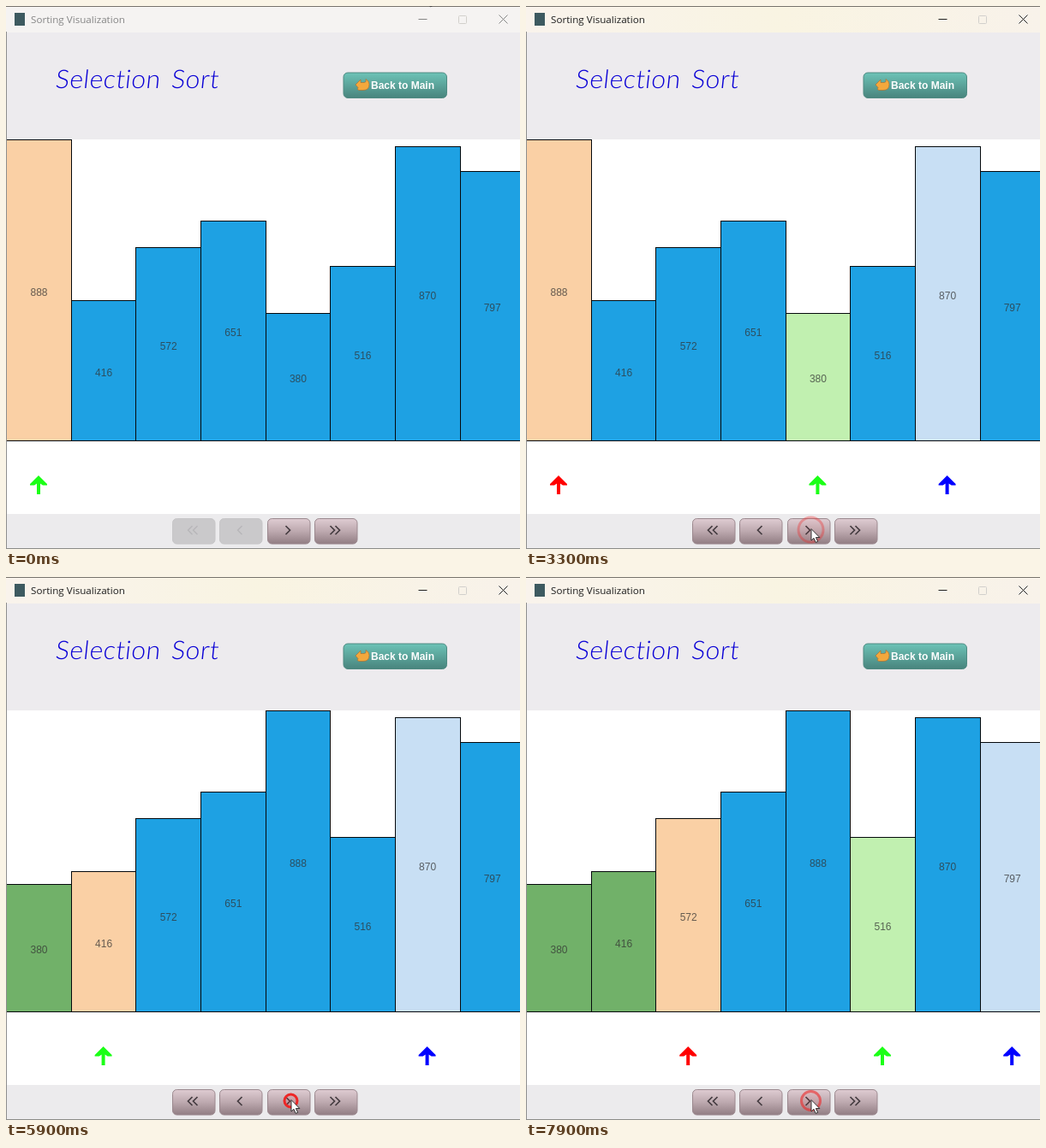
Animation, 600 px wide and 635 px high, one loop 8 s. Source, as an HTML page:

```html
<!DOCTYPE html>
<html lang="en">
<head>
<meta charset="utf-8">
<title>Sorting Visualization</title>
<style>
html, body { margin: 0; width: 100%; height: 100%; overflow: hidden; background: #fff; }
svg { display: block; width: 600px; height: 635px; }
text { font-family: "Liberation Sans", Arial, sans-serif; font-size: 12px; }
#caption { font-family: "Open Sans", "Noto Sans", sans-serif; font-size: 11.65px; }
#heading { font-family: Lato, sans-serif; font-size: 30px; font-weight: 300; letter-spacing: .5px; word-spacing: 4px; fill: #0a00d6; }
#back { font-weight: bold; fill: #fff; }
#bars rect { stroke: #05090c; }
#bars text { text-anchor: middle; fill: #323232; fill-opacity: .74; }
.key path { fill: none; stroke: #453c41; stroke-width: 1.7; }
.key rect { fill: url(#pink); stroke: #9b888e; }
.key.off rect { fill: #cac9cb; stroke: #c6c5c7; }
.key.off path { stroke: #b7b6b9; stroke-width: 1.4; }
</style>
</head>
<body>
<svg viewBox="0 0 600 635">
  <defs>
    <linearGradient id="pink" x2="0" y2="1">
      <stop stop-color="#dfccd2"/><stop offset=".5" stop-color="#bda9af"/><stop offset="1" stop-color="#917d83"/>
    </linearGradient>
    <linearGradient id="teal" x2="0" y2="1">
      <stop stop-color="#6dc3b7"/><stop offset="1" stop-color="#48847d"/>
    </linearGradient>
    <linearGradient id="cream">
      <stop stop-color="#f9f3ec"/><stop offset=".5" stop-color="#f9f4e2"/><stop offset="1" stop-color="#f8f2ea"/>
    </linearGradient>
    <path id="arrow" d="M0 549l10 10v1.500h-5l-3-2v12.500h-4v-12.500l-3 2h-5v-1.500z"/>
  </defs>

  <rect width="600" height="635" fill="#fff"/>
  <rect id="titlebar" width="600" height="31"/>
  <rect y="31" width="600" height="125" fill="#edebee"/>
  <rect y="594" width="600" height="41" fill="#ecebed"/>
  <rect width="600" height="1" fill="#77736c"/>
  <rect y="634" width="600" height="1" fill="#8b8b87"/>

  <rect x="10" y="8" width="12" height="15" fill="#3d5a60"/>
  <text id="caption" x="29" y="20">Sorting Visualization</text>
  <g id="controls" fill="none">
    <path d="M481.500 15.500h10M575.500 10.500l10 10m0-10l-10 10"/>
  </g>
  <rect x="528.500" y="11.500" width="9" height="9" rx="1" fill="none" stroke="#d2d0cc"/>

  <text id="heading" transform="translate(57 96) skewX(-6)">Selection Sort</text>
  <rect x="394" y="78" width="120.500" height="29.500" rx="5" fill="url(#teal)" stroke="#4f8a82"/>
  <path d="M408 92l6-6v3.500h4q3 0 2-4q4 2 4 6q0 7-7 7h-5q-3-1-1-3z" fill="#f3a83c" stroke="#a9692a" stroke-width=".6"/>
  <text id="back" x="426" y="97">Back to Main</text>

  <g id="bars"></g>
  <rect y="30" width="1" height="605" fill="#8f8f8f"/>
  <use id="first" href="#arrow" fill="#f00"/>
  <use id="least" href="#arrow" fill="#1bff16"/>
  <use id="probe" href="#arrow" fill="#00f"/>

  <g id="keys"></g>
  <circle id="ring" cx="332.500" cy="612.500" fill="#f33" fill-opacity=".12" stroke="#ee2626" stroke-width="3"/>
  <path id="cursor" d="M0 0v13.500l3-2.700 2.200 5 2.400-1-2.200-4.800h4.400z" fill="#fff" stroke="#222" stroke-width=".9"/>
</svg>

<script>
const LOOP = 8000, TICK = 100, STEP_X = 75.65, FLOOR = 508.5;
const $ = id => document.getElementById(id);
const set = (el, attrs) => { for (const k in attrs) el.setAttribute(k, attrs[k]); return el; };
const add = (parent, tag, attrs = {}) =>
  parent.appendChild(set(document.createElementNS("http://www.w3.org/2000/svg", tag), attrs));

const COLORS = { idle: "#1ea1e3", current: "#fad0a5", probe: "#c8dff4", least: "#c1f0b0", done: "#71b169" };
const stepTimes = [0, 1200, 1600, 1900, 2100, 2400, 2600, 2900, 3200, 3500, 4000, 4300,
  4600, 4900, 5200, 5600, 6000, 6500, 6800, 7000, 7300, 7500, 7700, 7900];

// One entry per click of the "next" button.
function sortSteps(values) {
  const steps = [], list = [...values];
  for (let i = 0; i < list.length - 1; i++) {
    let min = i;
    const push = j => steps.push({ list: [...list], i, min, j });
    push(-1);
    for (let j = i + 1; j < list.length; j++) {
      push(j);
      if (list[j] < list[min]) { min = j; push(-1); }
    }
    [list[i], list[min]] = [list[min], list[i]];
  }
  return steps;
}
const steps = sortSteps([888, 416, 572, 651, 380, 516, 870, 797]);

const edge = k => Math.round(STEP_X * k) + .5;
const barTop = v => Math.round(509.95 - .3982 * v) + .5;
const bars = steps[0].list.map((_, k) => ({
  box: add($("bars"), "rect", { x: edge(k), width: edge(k + 1) - edge(k) }),
  label: add($("bars"), "text", { x: 38.5 + 75.6 * k })
}));

const keys = [[-1, 2], [-1, 1], [1, 1], [1, 2]].map(([dir, count], n) => {
  const x = Math.round(194 + 55.4 * n) + .5;
  const key = add($("keys"), "g", { class: "key" });
  add(key, "rect", { x, y: 599.5, width: 49.5, height: 29.5, rx: 5 });
  for (let c = 0; c < count; c++) {
    const tip = x + 23.5 + dir * 2.5 + (c - (count - 1) / 2) * 6;
    add(key, "path", { d: `M${tip - dir * 5} 608l${dir * 5} 5l${-dir * 5} 5` });
  }
  return key;
});

function place(id, k, visible) {
  set($(id), { x: 38 + 75.6 * k, visibility: visible ? "visible" : "hidden" });
}

function barColor(k, { i, min, j }) {
  if (k < i) return COLORS.done;
  if (k === i) return COLORS.current;
  if (k === min) return COLORS.least;
  return k === j ? COLORS.probe : COLORS.idle;
}

function drawStep(n) {
  const s = steps[n];
  bars.forEach(({ box, label }, k) => {
    const v = s.list[k], top = barTop(v);
    set(box, { y: top, height: FLOOR - top, fill: barColor(k, s) });
    set(label, { y: (top + FLOOR) / 2 + 6 });
    label.textContent = v;
  });
  place("first", s.i, s.min !== s.i);
  place("least", s.min, true);
  place("probe", s.j, s.j >= 0);
  keys.slice(0, 2).forEach(key => key.classList.toggle("off", n === 0));
}

function drawPointer(t) {
  const p = Math.min(t / 800, 1), e = p * p * (3 - 2 * p);
  set($("cursor"), { transform: `translate(${490 - 157 * e} ${-15 + 626.5 * e})` });
  const press = stepTimes.slice(1).map(s => s - TICK).filter(s => s <= t).pop();
  const age = press === undefined ? Infinity : t - press;
  const alpha = age === 0 ? 1 : Math.max(0, .85 - age / 400);
  set($("ring"), { r: age < 400 ? 7.5 + .035 * age : 0, opacity: alpha });
}

function drawTitle(active) {
  set($("titlebar"), { fill: active ? "url(#cream)" : "#f5f3f2" });
  set($("caption"), { fill: active ? "#1c1c1c" : "#858585" });
  set($("controls"), { stroke: active ? "#222" : "#858585" });
}

function frame() {
  const t = Math.floor(performance.now() % LOOP / TICK) * TICK;
  drawStep(stepTimes.filter(s => s <= t).length - 1);
  drawPointer(t);
  drawTitle(t >= 800);
  requestAnimationFrame(frame);
}
frame();
</script>
</body>
</html>
```
